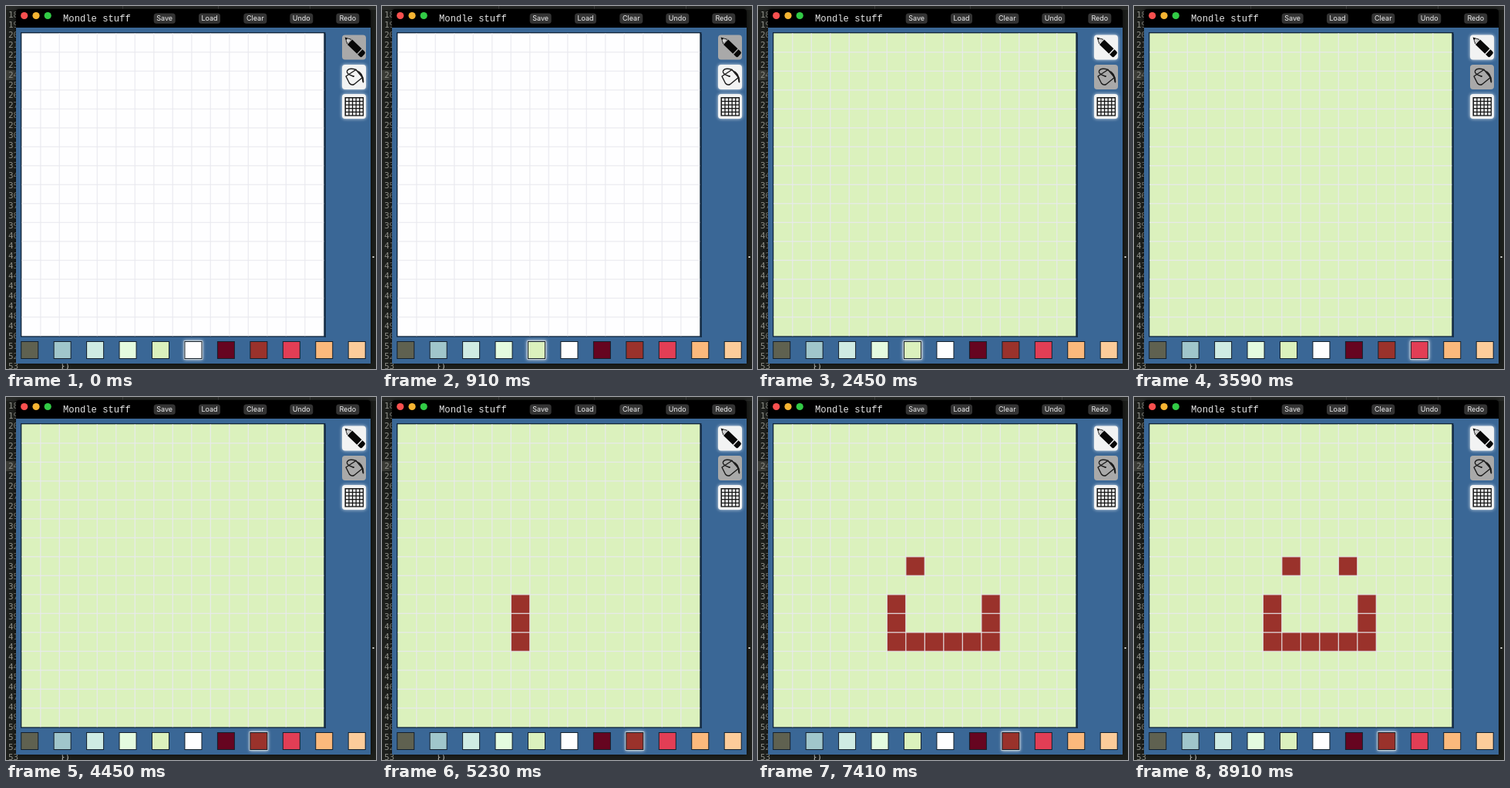
An HTML page with a canvas for the animation above (8.96 s loop, 480x470 px).

```html
<!DOCTYPE html>
<html lang="en">
<head>
<meta charset="utf-8">
<title>Mondle stuff</title>
<style>
html, body { margin: 0; width: 100%; height: 100%; overflow: hidden; background: #1d1f1c; }
canvas { display: block; width: 480px; height: 470px; }
</style>
</head>
<body>
<canvas id="stage"></canvas>
<script>
const LOOP = 8960, CELL = 24.5, BOARD_X = 20.3, BOARD_Y = 35.3, COUNT = 16;
const COLORS = ['#5f6150', '#a0c6cb', '#cfebe3', '#e4fbdf', '#dbf1bd', '#fefeff',
  '#660520', '#9a322b', '#e23e55', '#fbb97c', '#fccc9a'];
const GREEN = 4, WHITE = 5, BROWN = 7, RED = 8;

// [time, palette index]
const PICKS = [[0, WHITE], [780, GREEN], [3050, RED], [4250, BROWN]];
const FILL_AT = 1080, PENCIL_AT = 2300;

// [time, column, row]: the mouth is one stroke, the eyes are single clicks
const mouth = [[6, 9], [6, 10], [6, 11], [7, 11], [8, 11], [9, 11], [10, 11], [11, 11], [11, 10], [11, 9]];
const marks = mouth.map(([c, r], i) => [4930 + i * 110, c, r]);
marks.push([6950, 7, 7], [8000, 10, 7]);

const canvas = document.getElementById('stage');
const ctx = canvas.getContext('2d');
const ratio = window.devicePixelRatio || 1;
canvas.width = 480 * ratio;
canvas.height = 470 * ratio;
ctx.scale(ratio, ratio);

function rect(x, y, w, h, color) {
  ctx.fillStyle = color;
  ctx.fillRect(x, y, w, h);
}

function round(x, y, w, h, r, color) {
  ctx.fillStyle = color;
  ctx.beginPath();
  ctx.roundRect(x, y, w, h, r);
  ctx.fill();
}

function text(str, x, y, font, color, align = 'left') {
  ctx.font = font;
  ctx.fillStyle = color;
  ctx.textAlign = align;
  ctx.fillText(str, x, y);
}

function glow(draw, color, blur) {
  ctx.save();
  ctx.shadowColor = color;
  ctx.shadowBlur = blur * ratio;
  draw();
  ctx.restore();
}

function editor() {
  rect(0, 0, 480, 470, '#1d1f1c');
  rect(0, 0, 480, 5, '#292b29');
  for (const x of [151, 275, 394]) rect(x, 0, 1, 5, '#454745');
  rect(0, 83, 14, 13, '#393a35');
  const mono = '11px "DejaVu Sans Mono", monospace';
  for (let n = 18; n <= 53; n++) text(n, 3, 15 + (n - 18) * 13, mono, '#8c8d86');
  text('})', 70, 470, mono, '#c9c9c2');
  rect(475.5, 324, 2, 2, '#e8e8e2');
}

function windowFrame() {
  glow(() => round(13, 4, 460, 459, 4, '#000'), 'rgba(0,0,0,.7)', 5);
  rect(13, 28, 460, 435, '#3a6796');
  [['#f8504f', 23.7], ['#f5b432', 39], ['#32cb46', 54.2]].forEach(([color, x]) =>
    round(x - 4.6, 7.9, 9.2, 9.2, 4.6, color));
  text('Mondle stuff', 74, 20, '12.2px "Liberation Mono", "Courier New", monospace', '#e4e4e4');
  ['Save', 'Load', 'Clear', 'Undo', 'Redo'].forEach((label, i) => {
    const x = [205.7, 264, 323.3, 383.3, 443.3][i], w = [28, 28, 30, 30, 30][i];
    round(x - w / 2, 9.5, w, 13.2, 3.5, '#343434');
    text(label, x, 19.4, '9px Inter, sans-serif', '#ededed', 'center');
  });
}

function board(t) {
  const size = CELL * COUNT;
  rect(19, 34, size + 3.4, size + 2.6, '#10243a');
  rect(413.2, 36, 1.8, 393, '#17304b');
  rect(BOARD_X, BOARD_Y, size, size, COLORS[t < FILL_AT ? WHITE : GREEN]);
  for (const [at, c, r] of marks)
    if (t >= at) rect(BOARD_X + c * CELL, BOARD_Y + r * CELL, CELL, CELL, COLORS[BROWN]);
  for (let i = 1; i < COUNT; i++) {
    const p = i * CELL - .65;
    rect(BOARD_X + p, BOARD_Y, 1.3, size, 'rgba(233,233,239,.85)');
    rect(BOARD_X, BOARD_Y + p, size, 1.3, 'rgba(233,233,239,.85)');
  }
}

function button(y, active) {
  const draw = () => round(436, y, 31, 32, 4, active ? '#f2f3f3' : '#a9a9a9');
  if (active) glow(draw, 'rgba(255,255,255,.8)', 4);
  else draw();
}

function pencil() {
  ctx.save();
  ctx.translate(439.6, 40.6);
  ctx.rotate(.765);
  ctx.fillStyle = '#080808';
  ctx.fill(new Path2D('M0 0L8-4.3V4.3Z M9-4.5H26V4.5H9Z M27.3-4.5H31Q33.5-4.5 33.5-2V2Q33.5 4.5 31 4.5H27.3Z'));
  ctx.fillStyle = 'rgba(245,245,245,.85)';
  ctx.fill(new Path2D('M3.6-1.2L8-3.2V3.2L3.6 1.2Z'));
  ctx.restore();
}

function bucket() {
  ctx.save();
  ctx.strokeStyle = ctx.fillStyle = '#1b1b1b';
  ctx.lineWidth = 1.4;
  ctx.lineJoin = ctx.lineCap = 'round';
  ctx.stroke(new Path2D('M441 91L454 82.5L462.5 92.5L451.5 101.5Q448 103 445.5 100Z'));
  ctx.stroke(new Path2D('M450.5 91Q441 88 442.5 84Q445 79.5 454 82.5'));
  ctx.fill(new Path2D('M455 83Q464 86 464.3 98Q463.8 101 462.3 98Q462 90 455 83Z'));
  ctx.beginPath();
  ctx.arc(450.8, 91, 1.1, 0, 7);
  ctx.fill();
  ctx.restore();
}

function gridIcon() {
  rect(439.5, 118, 24.5, 24.5, '#161616');
  for (let i = 0; i < 25; i++)
    rect(441 + i % 5 * 4.6, 119.5 + Math.floor(i / 5) * 4.6, 3.3, 3.3, '#f2f3f3');
}

function tools(t) {
  const drawing = t >= PENCIL_AT;
  button(37.5, drawing);
  button(76, !drawing);
  button(114, true);
  pencil();
  bucket();
  gridIcon();
}

function palette(t) {
  const selected = PICKS.filter(([at]) => t >= at).pop()[1];
  COLORS.forEach((color, i) => {
    const x = 19.2 + i * 42.45, y = 434;
    if (i === selected)
      glow(() => rect(x - .8, y - .8, 24.6, 24.6, '#c9d2d5'), 'rgba(255,255,255,.9)', 4);
    rect(x, y, 23, 23, '#14202c');
    rect(x + 1, y + 1, 21, 21, color);
  });
}

function frame(now) {
  const t = now % LOOP;
  editor();
  windowFrame();
  board(t);
  tools(t);
  palette(t);
  requestAnimationFrame(() => frame(performance.now()));
}
frame(0);
</script>
</body>
</html>
```
